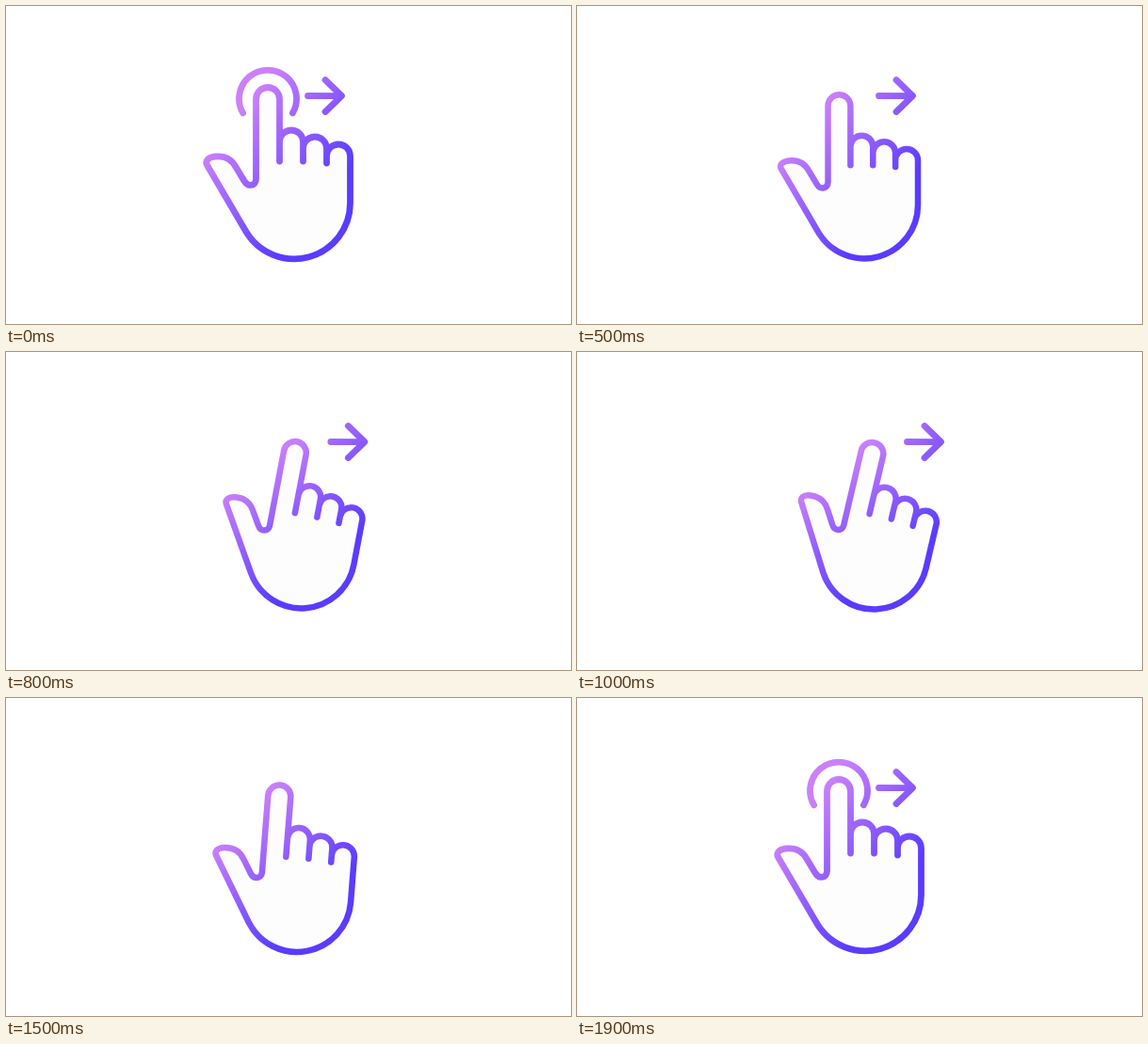
Write an HTML page that moves like this. It is 600 px wide and 338 px high and loops after 2 s.

```html
<!DOCTYPE html>
<html lang="en">
<head>
<meta charset="utf-8">
<title>Swipe right</title>
<style>
  html, body { margin: 0; width: 100%; height: 100%; overflow: hidden; background: #fff; }
  svg { display: block; width: 100vw; height: 100vh; }
</style>
</head>
<body>
<svg viewBox="0 0 600 338">
  <defs>
    <linearGradient id="ink" gradientUnits="userSpaceOnUse" x1="225" y1="140" x2="324" y2="221">
      <stop offset="0" stop-color="#cb80fa"/>
      <stop offset="1" stop-color="#593cff"/>
    </linearGradient>
  </defs>
  <g fill="none" stroke="url(#ink)" stroke-width="6.8" stroke-linecap="round" stroke-linejoin="round">
    <path id="ring" d="M251.6 113.8A30.5 30.5 0 1 1 304.4 113.8"/>
    <path id="arrow" d="M320.5 95.5L356 95.6M339 78.5L356.5 95.5L339 112.5"/>
    <path id="hand" fill="#fdfdfd" d="M290.5 165V99a12.5 12.5 0 0 0-25 0V184
      C265.5 191 257 193 253 186L244 171C239 162 231 159 222 160C213.5 161 211 165.5 214 170
      L255 240A59.5 59.5 0 0 0 365.5 209.5
      V159.5a12.5 12.5 0 0 0-25 0V167V151.5a12.5 12.5 0 0 0-25 0V165V144.5a12.5 12.5 0 0 0-25 0z"/>
  </g>
</svg>
<script>
  const LOOP = 2000, STEP = 100;
  const PIVOT = [288, 258], PRESS = 0.045, TILT = 13.2, SLIDE = 30;
  const [ring, arrow, hand] = ['ring', 'arrow', 'hand'].map(id => document.getElementById(id));

  // Eased progress from 0 to 1 between two times.
  const ease = (t, from, to) => {
    const p = Math.min(1, Math.max(0, (t - from) / (to - from)));
    return (1 - Math.cos(Math.PI * p)) / 2;
  };

  function draw(time) {
    const t = Math.floor((time % LOOP) / STEP) * STEP;
    const press = ease(t, 110, 460) - ease(t, 1400, 1750);
    const swipe = ease(t, 500, 920);
    const tilt = TILT * (swipe - ease(t, 1300, 1630));
    const back = ease(t, 1600, 1900);
    const [x, y] = PIVOT;

    hand.setAttribute('transform',
      `translate(${x} ${y}) rotate(${tilt}) scale(${1 - PRESS * press}) translate(${-x} ${-y})`);
    ring.setAttribute('opacity', 1 - ease(t, 110, 430) + back);
    arrow.setAttribute('opacity', 1 - ease(t, 1300, 1490) + back);
    arrow.setAttribute('transform', `translate(${t < 1500 ? SLIDE * swipe : 0} 0)`);
  }

  const start = performance.now();
  function tick() {
    draw(performance.now() - start);
    requestAnimationFrame(tick);
  }
  tick();
</script>
</body>
</html>
```
